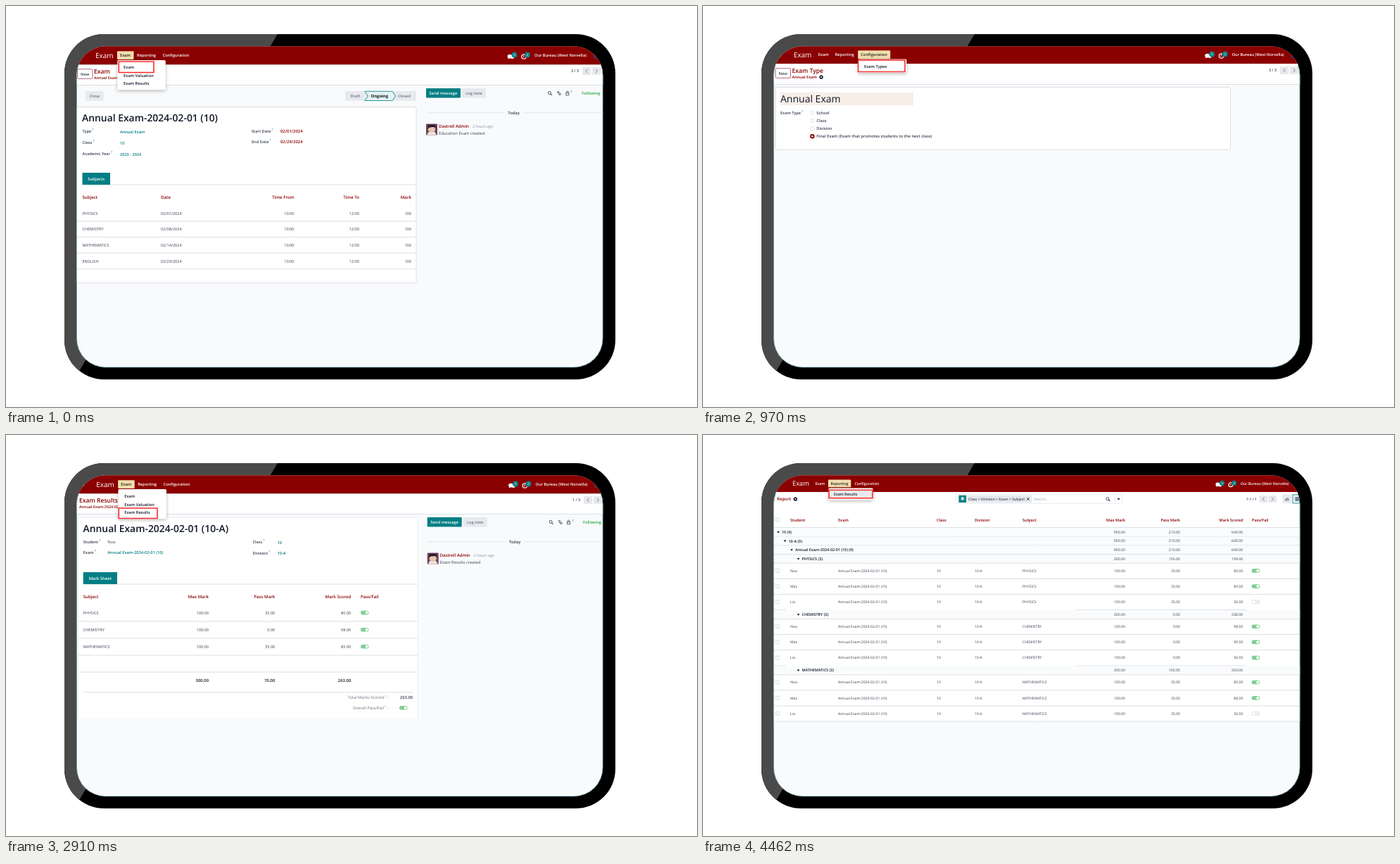
These frames come from a looping animation (982 px wide and 570 px high, 4850 ms). An HTML page with a canvas:

```html
<!DOCTYPE html>
<html lang="en">
<head>
<meta charset="utf-8">
<title>Exam management</title>
<style>
html, body { margin: 0; width: 100%; height: 100%; overflow: hidden; background: #fff; }
canvas { display: block; }
</style>
</head>
<body>
<canvas id="stage" width="982" height="570"></canvas>
<script>
const ctx = document.getElementById('stage').getContext('2d');
const SLIDE_MS = 970;
const FONT = '"Open Sans", "Noto Sans", sans-serif';
const RED = '#8b0000', TEAL = '#017e84', INK = '#374151', DARK = '#111827', GRAY = '#e7e9ed';
const MUTED = '#6b7280', LINE = '#dcdfe4', ALERT = '#fa2a2a', PAGE = '#f8fafc', GREEN = '#7fcf95';

function text(str, x, y, size = 5.6, color = INK, weight = 600, align = 'left') {
  ctx.font = `${weight} ${size}px ${FONT}`;
  ctx.fillStyle = color;
  ctx.textAlign = align;
  ctx.fillText(str, x, y + size * 0.36);
}

function box(x1, y1, x2, y2, fill, stroke, width = 1, radius = 0) {
  ctx.beginPath();
  ctx.roundRect(x1, y1, x2 - x1, y2 - y1, radius);
  if (fill) { ctx.fillStyle = fill; ctx.fill(); }
  if (stroke) { ctx.strokeStyle = stroke; ctx.lineWidth = width; ctx.stroke(); }
}

function path(points, stroke, width = 0.8, fill) {
  ctx.beginPath();
  points.forEach(([x, y]) => ctx.lineTo(x, y));
  if (fill) { ctx.closePath(); ctx.fillStyle = fill; ctx.fill(); }
  if (stroke) { ctx.strokeStyle = stroke; ctx.lineWidth = width; ctx.stroke(); }
}

function dot(x, y, r, fill, stroke, width = 0.8) {
  ctx.beginPath();
  ctx.arc(x, y, r, 0, Math.PI * 2);
  if (fill) { ctx.fillStyle = fill; ctx.fill(); }
  if (stroke) { ctx.strokeStyle = stroke; ctx.lineWidth = width; ctx.stroke(); }
}

const rule = (x1, x2, y, color = LINE) => path([[x1, y], [x2, y]], color, 1);

function within(x, y, scale, draw) {
  ctx.save();
  ctx.translate(x, y);
  ctx.scale(scale, scale);
  draw();
  ctx.restore();
}

function label(str, x, y) {
  text(str, x, y, 5.6, INK);
  text('?', x + ctx.measureText(str).width + 1.2, y - 2.2, 4, TEAL);
}

function toggle(x, y, on = true) {
  box(x, y - 2.8, x + 11.5, y + 2.8, on ? GREEN : '#eceef1', on ? null : '#dfe2e6', 0.6, 2.8);
  dot(on ? x + 8.6 : x + 2.9, y, 2, '#fff');
}

function gear(x, y) {
  dot(x, y, 1.8, null, DARK, 1.5);
  for (let i = 0; i < 8; i++) {
    const a = i * Math.PI / 4;
    dot(x + Math.cos(a) * 2.4, y + Math.sin(a) * 2.4, 0.5, DARK);
  }
}

function magnifier(x, y) {
  dot(x - 0.6, y - 0.6, 2, null, INK, 0.9);
  path([[x + 0.8, y + 0.8], [x + 2.8, y + 2.8]], INK, 1.1);
}

// Top bar: left menu and right tools, each placed from its own anchor.
function navBar({ x, y, right, bottom, active, scale = 1 }) {
  box(98, 55, 850, bottom, RED);
  within(x, y, scale, () => {
    path([[-19, 3], [-17, 0]], '#fff', 1);
    text('Exam', 0, 0, 10, '#fff', 400);
    const items = [['Exam', 35, 31, 54.5], ['Reporting', 59, 55, 90], ['Configuration', 95.6, 91.5, 137.5]];
    items.forEach(([name, tx, x1, x2], i) => {
      if (i === active) box(x1, -5.7, x2, 6, '#f1dfae', null, 1, 1);
      text(name, tx, 0, 5.7, i === active ? '#222' : '#fff');
    });
  });
  within(right, y, scale, () => {
    ctx.fillStyle = '#fff';
    ctx.beginPath();
    ctx.ellipse(-35, 1.5, 3.4, 2.8, 0, 0, Math.PI * 2);
    ctx.ellipse(-31.5, 3, 2.6, 2, 0, 0, Math.PI * 2);
    ctx.fill();
    path([[-37, 3], [-38, 5.2], [-34, 4]], null, 0, '#fff');
    dot(-15.2, 2, 3.2, null, '#fff', 1.2);
    path([[-15.2, 0.2], [-15.2, 2.4], [-16.6, 2.4]], '#fff');
    for (const [bx, n] of [[-28.5, 5], [-10, 2]]) {
      dot(bx, -0.5, 3.9, '#0b8288');
      text(n, bx, -0.6, 4.6, '#fff', 400, 'center');
    }
    text('Our Bureau (West Norvella)', 0, 0, 5.6, '#fff');
    box(84, -3, 92, 5, '#4b3347');
  });
}

function pager(str, x, y) {
  text(str, x, y, 5.4, INK);
  for (const [off, dir] of [[16, -1], [30, 1]]) {
    box(x + off, y - 5.5, x + off + 12.5, y + 5.5, GRAY, null, 1, 1);
    const c = x + off + 6.2;
    path([[c - dir * 1.3, y - 2.7], [c + dir * 1.3, y], [c - dir * 1.3, y + 2.7]], MUTED, 0.9);
  }
}

function controlPanel(top, bottom) {
  box(98, top, 850, bottom, '#fff');
  rule(98, 850, bottom);
}

function newButton(x, y) {
  box(x, y - 6.8, x + 21.5, y + 6.8, '#fff', '#a9566a', 0.9, 1.5);
  text('New', x + 10.7, y + 0.2, 5.7, INK, 600, 'center');
}

function dropdown(x1, y1, x2, y2) {
  ctx.save();
  ctx.shadowColor = 'rgba(0,0,0,.28)';
  ctx.shadowBlur = 5;
  ctx.shadowOffsetY = 1.5;
  box(x1, y1, x2, y2, '#fff', null, 1, 1.5);
  ctx.restore();
}

function examMenu(x, y, picked) {
  dropdown(x, y, x + 68.5, y + 42.3);
  ['Exam', 'Exam Valuation', 'Exam Results'].forEach((item, i) =>
    text(item, x + 8.8, y + 10 + i * 11.6, 5.7, DARK));
  box(...picked, null, ALERT, 1.6);
}

function chatter(x, message) {
  box(x, 117, x + 49, 130.5, TEAL, null, 1, 1);
  text('Send message', x + 24.5, 124, 5.8, '#fff', 600, 'center');
  box(x + 51, 117, x + 85, 130.5, GRAY, null, 1, 1);
  text('Log note', x + 68, 124, 5.6, MUTED, 600, 'center');
  magnifier(x + 176, 124);
  path([[x + 187, 122.5], [x + 190.5, 126.5], [x + 191.8, 125.5], [x + 188.3, 121.3],
    [x + 186.5, 122], [x + 190, 127]], INK, 0.8);
  box(x + 198.8, 123.5, x + 203, 126.8, null, INK, 0.8);
  path([[x + 199.7, 123.5], [x + 199.7, 121.2], [x + 202.1, 121.2], [x + 202.1, 123.5]], INK, 0.7);
  text('1', x + 205.6, 121.5, 4, INK);
  text('Following', x + 221.3, 124, 5.7, '#28a745');
  rule(x, x + 111, 151.7, '#e4e7eb');
  rule(x + 138, 850, 151.7, '#e4e7eb');
  text('Today', x + 124.5, 152.2, 5.8, INK, 600, 'center');

  ctx.save();
  box(x, 167.5, x + 16, 183.5, '#6c4560', null, 1, 1);
  ctx.clip();
  dot(x + 8, 184, 6.5, '#eee3dc');
  dot(x + 8, 174.8, 5.2, '#e9c6b0');
  path([[x + 2.3, 175], [x + 3, 169], [x + 13, 169], [x + 13.7, 175], [x + 11.5, 172], [x + 5, 172.5]], null, 0, '#2a1a22');
  ctx.restore();

  text('Dastrell Admin', x + 18, 171, 6, RED);
  text('- 2 hours ago', x + 63, 171, 5.3, '#8b919b', 400);
  text(message, x + 18, 180.8, 5.8, INK, 400);
}

function tab(name, x1, x2, y, end) {
  rule(x1, end, y + 17);
  box(x1, y, x2, y + 17, TEAL);
  text(name, (x1 + x2) / 2, y + 9, 5.9, '#fff', 600, 'center');
}

const rowOf = (cells, columns, y, size, color, weight) =>
  cells.forEach((cell, i) => text(cell, columns[i][0], y, size, color, weight, columns[i][1]));

function examPage() {
  navBar({ x: 127, y: 70, right: 751, bottom: 83.5, active: 0 });
  controlPanel(83.5, 112.5);
  newButton(101.5, 96.5);
  text('Exam', 125, 93, 8.6, RED);
  text('Annual Exam-2024-02-01 (10)', 125, 102, 5.4, RED);
  pager('3 / 3', 803, 92.5);
  examMenu(158.3, 77, [160.3, 79, 210, 94.5]);

  box(113, 121, 138.5, 134.8, GRAY, null, 1, 1);
  text('Close', 125.7, 128, 5.6, MUTED, 600, 'center');
  box(482, 121, 583, 134.8, GRAY, null, 1, 1);
  path([[510, 121.3], [549, 121.3], [553.5, 128], [549, 134.5], [510, 134.5], [514.5, 128], [510, 121.3]], TEAL, 0.8, '#e6f2f3');
  text('Draft', 489.5, 128, 5.6, MUTED);
  text('Ongoing', 518.5, 128, 5.9, DARK, 700);
  text('Closed', 557, 128, 5.6, MUTED);

  box(99, 143.5, 583, 393.7, '#fff', LINE, 1, 1);
  text('Annual Exam-2024-02-01 (10)', 108, 159, 13.9, DARK);
  [['Type', 'Annual Exam'], ['Class', '10'], ['Academic Year', '2023 - 2024']].forEach(([name, value], i) => {
    label(name, 108.5, 178 + i * 16);
    text(value, 162, 178.5 + i * 16, 5.6, TEAL);
  });
  [['Start Date', '02/01/2024'], ['End Date', '02/29/2024']].forEach(([name, value], i) => {
    label(name, 349, 178 + i * 14.7);
    text(value, 390, 178 + i * 14.7, 5.9, RED);
  });

  tab('Subjects', 108.5, 148, 237, 583);
  const columns = [[108.5, 'left'], [220, 'left'], [409.5, 'right'], [502, 'right'], [576, 'right']];
  rowOf(['Subject', 'Date', 'Time From', 'Time To', 'Mark'], columns, 272, 6.1, RED, 600);
  [['PHYSICS', '01'], ['CHEMISTRY', '08'], ['MATHEMATICS', '14'], ['ENGLISH', '29']].forEach(([name, day], i) => {
    const y = 294.8 + i * 22.6;
    rowOf([name, `02/${day}/2024`, '10:00', '12:00', '100'], columns, y, 5.6, INK, 400);
    rule(99, 583, y + 11.2);
  });
  chatter(597, 'Education Exam created');
}

// The left and right sides of this form shift by slightly different amounts.
function typePage(dx, dr, dy) {
  controlPanel(82 + dy, 111.5 + dy);
  newButton(103 + dx, 95.5 + dy);
  text('Exam Type', 126.5 + dx, 91.5 + dy, 8.6, RED);
  text('Annual Exam', 126.5 + dx, 100.8 + dy, 5.6, RED);
  gear(168 + dx, 101 + dy);
  pager('3 / 3', 804 + dr, 91.5 + dy);
  box(103 + dx, 115.5 + dy, 749.5 + dr, 204.3 + dy, '#fff', LINE, 1, 1);
  box(110 + dx, 122.7 + dy, 299 + dx, 141 + dy, '#f7eee7');
  text('Annual Exam', 110 + dx, 132.2 + dy, 14, DARK, 400);
  label('Exam Type', 110 + dx, 151.7 + dy);
  const options = ['School', 'Class', 'Division', 'Final Exam (Exam that promotes students to the next class)'];
  options.forEach((option, i) => {
    const y = 151.6 + dy + i * 11.2;
    if (i === 3) dot(155.4 + dx, y, 2.2, '#fff', RED, 2);
    else dot(155.4 + dx, y, 2.8, '#fff', '#cfd3d9', 0.7);
    text(option, 161.3 + dx, y, 5.75, INK);
  });
}

function typesPage() {
  navBar({ x: 128.7, y: 69, right: 751.7, bottom: 82, active: 2 });
  typePage(0, 0, 0);
  dropdown(220.5, 75.5, 289.3, 95);
  text('Exam Types', 229, 86, 5.7, DARK);
  box(220.5, 77, 287, 93.5, null, ALERT, 1.6);
}

function valuationPage() {
  navBar({ x: 123, y: 67.4, right: 747.6, bottom: 80.6, active: 0 });
  typePage(-5.4, -4, -1.4);
  examMenu(154.2, 74.4, [155, 90.5, 215, 102.8]);
}

function resultsPage() {
  navBar({ x: 128.2, y: 70, right: 752.5, bottom: 83.5, active: 0 });
  controlPanel(83.5, 112.5);
  text('Exam Results', 104, 93, 8.6, RED);
  text('Annual Exam-2024-02-01 (10-A)', 104, 102, 5.4, RED);
  pager('1 / 3', 805, 92.5);
  box(102.5, 117, 585, 402, '#fff');
  path([[102.5, 402], [102.5, 117], [585, 117], [585, 402]], '#e6e9ed', 0.8);
  examMenu(159.5, 77, [160.3, 104, 215, 118.5]);

  text('Annual Exam-2024-02-01 (10-A)', 109.5, 133.2, 13.9, DARK);
  label('Student', 109.7, 152);
  text('Noa', 144.3, 152, 5.7, INK, 400);
  label('Exam', 109.7, 167);
  text('Annual Exam-2024-02-01 (10)', 144.3, 167, 5.7, TEAL);
  label('Class', 350.5, 152.2);
  text('10', 385.5, 152.5, 5.7, TEAL);
  label('Division', 350.5, 168);
  text('10-A', 385.5, 168.3, 5.7, TEAL);

  tab('Mark Sheet', 109.7, 158, 195, 585);
  const columns = [[109.7, 'left'], [288, 'right'], [382.3, 'right'], [490.3, 'right'], [504, 'left']];
  rowOf(['Subject', 'Max Mark', 'Pass Mark', 'Mark Scored', 'Pass/Fail'], columns, 230, 6.1, RED, 600);
  [['PHYSICS', '35.00', '80.00'], ['CHEMISTRY', '0.00', '98.00'], ['MATHEMATICS', '35.00', '85.00']].forEach(([name, pass, mark], i) => {
    const y = 252.6 + i * 24.1;
    rowOf([name, '100.00', pass, mark], columns, y, 5.6, INK, 400);
    toggle(504, y);
    rule(103, 585, y + 12.3);
  });
  rule(103, 585, 337);
  rowOf(['', '300.00', '70.00', '263.00'], columns, 349, 5.9, DARK, 600);
  rule(109.7, 578, 365.6);
  ['Total Marks Scored', 'Overall Pass/Fail'].forEach((name, i) => {
    const y = 373.2 + i * 14.5;
    text(name, 537, y, 5.8, MUTED, 400, 'right');
    text('?', 538, y - 2, 4, MUTED, 400);
    text(':', 543.5, y, 5.8, MUTED, 400, 'right');
  });
  text('263.00', 578, 373.2, 5.8, INK, 600, 'right');
  toggle(559, 387.7);
  chatter(598.7, 'Exam Results created');
}

function searchBar() {
  box(359, 84.3, 596, 97.3, '#fff', '#e2e5e9', 0.8, 1);
  box(363.5, 85.8, 374, 96, TEAL);
  for (const y of [89.3, 91.3]) path([[365.8, y], [368.8, y - 1.6], [371.8, y], [368.8, y + 1.6]], TEAL, 0.4, '#fff');
  box(374, 85.8, 467.5, 96, GRAY);
  text('Class > Division > Exam > Subject', 377, 91, 5.1, INK);
  for (const d of [-1, 1]) path([[460.2, 91 - 1.8 * d], [463.8, 91 + 1.8 * d]], DARK, 0.9);
  text('Search...', 470, 91, 5.3, '#9aa0a9', 400);
  magnifier(575.5, 91.2);
  path([[585, 84.5], [585, 97]], '#e2e5e9');
  path([[588.6, 90], [592.6, 90], [590.6, 92.4]], null, 0, DARK);
}

function reportPage() {
  navBar({ x: 127, y: 68.8, right: 764, bottom: 81, active: 1, scale: 0.925 });
  controlPanel(81, 102.5);
  box(98, 102, 850, 407, '#fff');
  text('Report', 105, 91, 6.2, RED);
  gear(131.3, 91);
  searchBar();
  within(772, 91, 0.93, () => pager('1-1 / 1', 4, 0));
  box(771, 84, 790, 98, '#fff');
  text('1-1 / 1', 772, 91, 5.1, INK);
  box(823.5, 84.8, 836, 97, GRAY);
  [2.5, 4.5, 3.5].forEach((h, i) => box(827 + i * 2, 93.4 - h, 828.3 + i * 2, 93.4, MUTED));
  box(838, 84.8, 852, 97, '#e6f2f3', TEAL, 0.8);
  for (const y of [89, 91, 93]) rule(841.5, 849, y, DARK);

  dropdown(178.3, 75.5, 241.5, 92.5);
  box(179, 78.2, 240.8, 89.8, '#e9eaec', ALERT, 1.6);
  text('Exam Results', 186, 84.2, 5.2, DARK);

  const columns = [[124, 'left'], [192, 'left'], [332, 'left'], [386, 'left'], [454, 'left'],
    [600, 'right'], [678, 'right'], [767.3, 'right'], [780, 'left']];
  const sums = columns.slice(5, 8);
  const checkbox = y => box(103.6, y - 2.5, 108.6, y + 2.5, '#fff', '#c9cdd3', 0.7, 0.7);
  const money = n => n.toFixed(2);

  checkbox(120.5);
  rowOf(['Student', 'Exam', 'Class', 'Division', 'Subject', 'Max Mark', 'Pass Mark', 'Mark Scored', 'Pass/Fail'],
    columns, 120.7, 5.6, RED, 600);
  rule(98, 850, 131.5);

  function group(name, level, y, totals) {
    const x = 107 + level * 9.5;
    box(98, y - 6, 850, y + 6, '#fafbfc');
    path([[x - 2, y - 1], [x + 2, y - 1], [x, y + 1.5]], null, 0, DARK);
    text(name, x + 5, y, 5.4, DARK);
    rowOf(totals.map(money), sums, y, 5.2, INK, 400);
    rule(98, 850, y + 6.3);
  }
  ['10 (9)', '10-A (9)', 'Annual Exam-2024-02-01 (10) (9)'].forEach((name, i) =>
    group(name, i, 138 + i * 12.6, [900, 210, 640]));

  const subjects = [['PHYSICS', 35, [80, 89, 30]], ['CHEMISTRY', 0, [98, 90, 50]], ['MATHEMATICS', 35, [85, 88, 30]]];
  subjects.forEach(([name, pass, marks], i) => {
    const top = 175.9 + i * 79.3;
    group(`${name} (3)`, 3, top, [300, pass * 3, marks.reduce((a, b) => a + b)]);
    marks.forEach((mark, j) => {
      const y = top + 17 + j * 22.2;
      checkbox(y);
      rowOf([['Noa', 'Max', 'Lia'][j], 'Annual Exam-2024-02-01 (10)', '10', '10-A', name, '100.00', money(pass), money(mark)],
        columns, y, 5.1, INK, 400);
      toggle(779.7, y, mark >= pass);
      if (j < 2 || i === 2) rule(98, 850, y + 11.3);
      else { rule(98, 118, y + 11.3); rule(530, 773, y + 11.3); }
    });
  });
}

function tablet(drawPage) {
  ctx.fillStyle = '#fff';
  ctx.fillRect(0, 0, 982, 570);
  ctx.save();
  box(83, 40, 866, 530.7, '#000', null, 1, 56);
  ctx.clip();
  path([[80, 38], [387, 38], [97, 531], [80, 531]], null, 0, '#4a4a4a');
  ctx.restore();
  ctx.save();
  box(100.3, 57.3, 848.3, 513.7, PAGE, null, 1, 41);
  ctx.clip();
  drawPage();
  ctx.restore();
  ctx.save();
  ctx.beginPath();
  ctx.rect(90, 84, 770, 440);
  ctx.clip();
  box(100.5, 57.5, 848, 513.5, null, 'rgba(40,120,128,.6)', 0.8, 41);
  ctx.restore();
}

const pages = [examPage, typesPage, valuationPage, resultsPage, reportPage];

function frame() {
  const index = Math.floor(performance.now() / SLIDE_MS) % pages.length;
  ctx.textRendering = 'geometricPrecision';
  tablet(pages[index]);
  requestAnimationFrame(frame);
}
frame();
</script>
</body>
</html>
```
